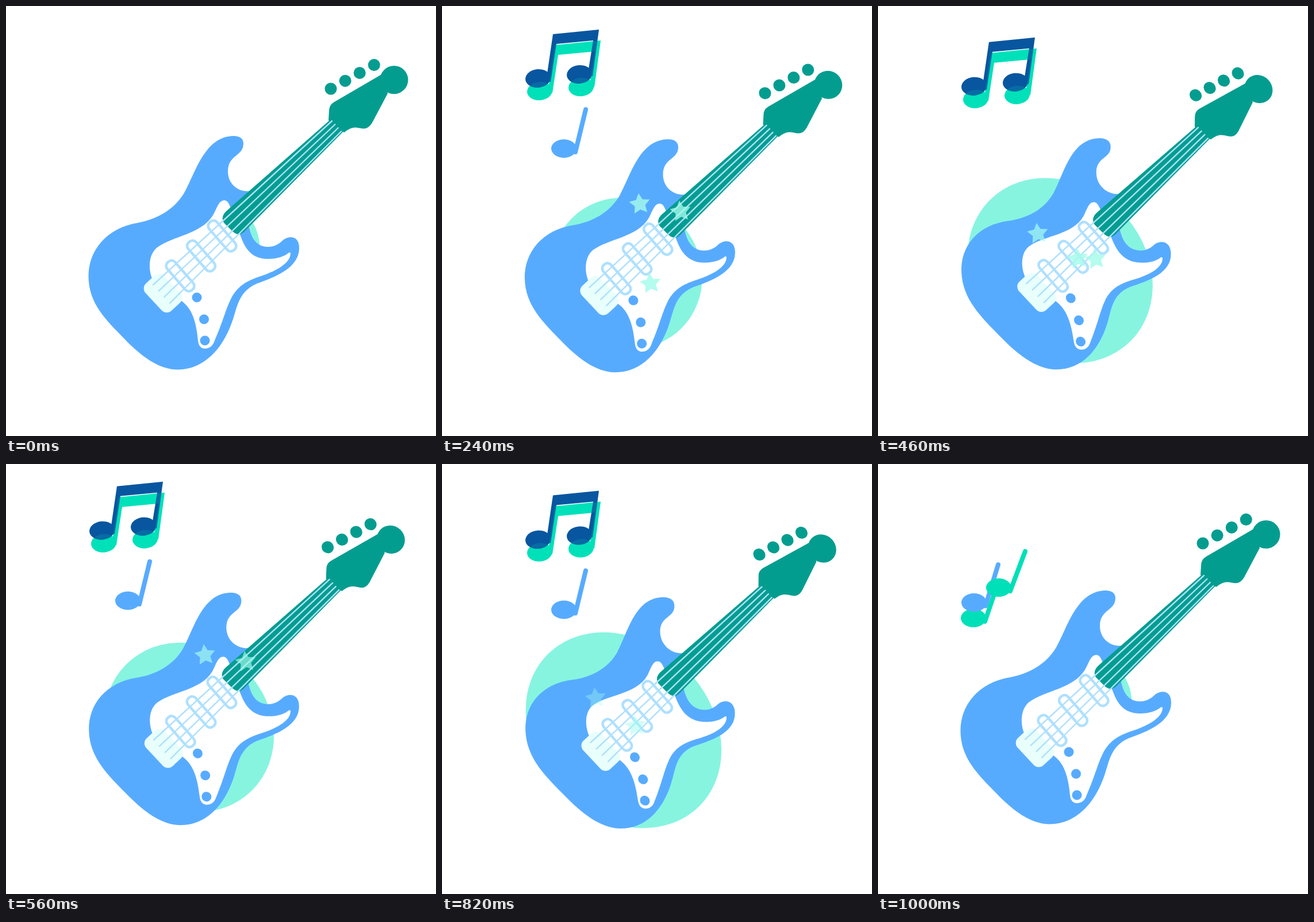
Animation, 748 px wide and 748 px high, one loop 1.02 s. Source, as an HTML page with a canvas:

```html
<!DOCTYPE html>
<html lang="en">
<head>
<meta charset="utf-8">
<title>Guitar</title>
<style>
html, body { margin: 0; width: 100%; height: 100%; overflow: hidden; background: #fff; }
canvas { display: block; width: 100vw; height: 100vh; }
</style>
</head>
<body>
<canvas id="stage" width="748" height="748"></canvas>
<script>
const ctx = document.getElementById('stage').getContext('2d');
const LOOP = 1020, BEAT = 340, SWING = 320, STEP = 20;
const BLUE = '#57abff', TEAL = '#039d90', GREEN = '#00e0b8', NAVY = '#0856a0';
const MINT = '#87f4e0', STRING = '#aee0ff', STAR = '#a6fcec';

const body = new Path2D('M424 322C402 324 386 308 386 288C386 258 413 262 413 239C413 229 404 226 396 226C345 227 330 290 310 325C292 355 262 371 230 377C175 386 143.5 425 143.5 470C143.5 518 175 547 206 579C234 608 265 632.5 299 632.5C345 632 376 596 392 553C402 528 402 498 436 483C470 471 510 455 510 421C510 398 490 399 480 409C465 423 445 421 435 411C424 400 424 385 419 372Z');
const guard = new Path2D('M380 338C370 338 367 352 360 364C340 397 290 400 263 420C247 433 247 460 256 478L300 510C325 523 331 552 334 582C335 592 340 596 346 596C354 596 360 591 363 582C377 550 382 528 391 510C402 487 420 478 440 471C468 462 495 448 495 430C494 427 491 430 488 432C474 441 450 442 438 437C412 427 409 398 398 374C391 352 388 338 380 338Z');
const neck = new Path2D('M565 197L383 357Q373 367 379 377L393 391Q404 402 414 393L592 213Z');
const head = new Path2D('M561 199L562 182Q562 172 571 167L655 118L664 152L637 203Q630 215 619 213C605 210 600 211 588 220Z');
const beam = new Path2D('M181 137L193 55L273 47L262 128L253 128L263 66L199 72L189 138Z');

const clamp = x => Math.max(0, Math.min(1, x));

function fill(color, path) {
  ctx.fillStyle = color;
  ctx.fill(path);
}

function oval(color, x, y, rx, ry = rx, tilt = 0) {
  ctx.beginPath();
  ctx.ellipse(x, y, rx, ry, tilt, 0, 7);
  ctx.fillStyle = color;
  ctx.fill();
}

function line(color, width, x1, y1, x2, y2) {
  ctx.strokeStyle = color;
  ctx.lineWidth = width;
  ctx.lineCap = 'round';
  ctx.beginPath();
  ctx.moveTo(x1, y1);
  ctx.lineTo(x2, y2);
  ctx.stroke();
}

function roundBox(x, y, w, h, r, deg) {
  ctx.save();
  ctx.translate(x, y);
  ctx.rotate(deg * Math.PI / 180);
  ctx.beginPath();
  ctx.roundRect(-w / 2, -h / 2, w, h, r);
  ctx.restore();
}

function drawDisc(p) {
  const q = p ** 0.25, k = 0.11 * p * p;
  ctx.save();
  ctx.transform(1, k, k, 1, 351 - 35.5 * q, 416 + 47.5 * q);
  oval(MINT, 0, 0, 90.5 + 82 * p);
  ctx.restore();
}

function drawGuitar(k) {
  ctx.save();
  // Squash along the neck: shear about (135, 425).
  ctx.transform(1, k, k, 1, -425 * k, -135 * k);
  ctx.translate(0, -6);
  fill(BLUE, body);
  fill('#fff', guard);
  roundBox(273, 499.5, 65, 44, 12, 47);
  ctx.fillStyle = '#e8fffb';
  ctx.fill();
  oval(BLUE, 332, 507, 8.5);
  oval(BLUE, 344.5, 545, 8.5);
  oval(BLUE, 346, 582, 8.5);
  fill(TEAL, neck);
  fill(TEAL, head);
  oval(TEAL, 675, 128.5, 24.5);
  for (let i = 0; i < 4; i++) {
    oval(TEAL, 565 + 25.1 * i, 144 - 13.8 * i, 10.5);
    line(STRING, 2.4, 256 + 9.7 * i, 485 + 10.6 * i, 567 + 5.4 * i, 200 + 6 * i);
  }
  for (let i = 0; i < 3; i++) {
    roundBox(303 + 36.5 * i, 469.5 - 34.7 * i, 64, 18, 8, 49);
    ctx.lineWidth = 4.5;
    ctx.stroke();
  }
  ctx.restore();
}

function note(color, x, y, stemX, stemY) {
  line(color, 8, x + 20, y + 6, x + stemX, y + stemY);
  oval(color, x, y, 22, 16);
}

function pairShape(color, dx, dy, drop = 0) {
  ctx.save();
  ctx.translate(dx, dy);
  const shape = new Path2D(beam);
  for (const [x, y] of [[167, 132], [239, 125]]) {
    const part = new Path2D();
    part.ellipse(x, y + drop, 22, 16, -0.1, 0, 7);
    shape.addPath(part);
  }
  fill(color, shape);
  ctx.restore();
}

function drawPair(dy) {
  pairShape(GREEN, 3, 19 + dy, 3);
  pairShape(NAVY, 0, dy);
  // Let a little green show through the overlap.
  ctx.globalAlpha = 0.15;
  pairShape(GREEN, 3, 19 + dy, 3);
  ctx.globalAlpha = 1;
}

function drawNotes(ph) {
  const rise = 61 * (1 - clamp((ph - 60) / 130)) ** 1.5 - 15;
  if (ph >= 60 && ph < 250) drawPair(rise);
  if (ph >= 130 && ph < 250) note(BLUE, 212, 254 + rise, 38, -68);
  if (ph >= 250 && ph < 335) {
    const lag = (SWING - ph) * 0.2;
    note(GREEN, 166, 268 + lag, 40, -53);
    note(BLUE, 167, 241 + lag, 42, -66);
    note(GREEN, 210, 215 + lag, 46, -63);
  }
}

// A star accelerates along its drift, fading in and quickly out.
function drawStar(t, born, life, x, y, dx, dy) {
  const u = (t - born) / life;
  if (u <= 0 || u >= 1) return;
  const s = u ** 2.4;
  ctx.save();
  ctx.translate(x + dx * s, y + dy * s);
  ctx.rotate(-0.12);
  ctx.globalAlpha = 0.85 * Math.min(1, u * 3, (1 - u) * 8);
  ctx.beginPath();
  for (let i = 0; i < 10; i++) {
    const r = i % 2 ? 9.5 : 19, a = i * Math.PI / 5;
    ctx.lineTo(r * Math.sin(a), -r * Math.cos(a));
  }
  ctx.fillStyle = STAR;
  ctx.fill();
  ctx.restore();
}

function drawStars(t) {
  for (const beat of [0, BEAT]) {
    drawStar(t, beat + 120, 380, 350, 330, -94, 88);
    drawStar(t, beat + 120, 390, 421, 340, -102, 140);
    drawStar(t, beat * 0.85 + 70, 200, 385, 429, -33, 66);
  }
  drawStar(t, 560, 200, 305, 387, -40, 70);
}

function draw(t) {
  const ph = t % BEAT, u = clamp(ph / SWING);
  const swell = (1 - Math.cos(2 * Math.PI * u)) / 2;
  const squash = 0.0455 * Math.sin(Math.PI * u ** 0.83) ** 3;
  const lift = t < BEAT
    ? 6 + 3 * Math.sin(2.2 * u)
    : -1.5 * Math.sin(Math.PI * clamp((t - BEAT) / SWING));
  ctx.setTransform(1, 0, 0, 1, 0, 0);
  ctx.fillStyle = '#fff';
  ctx.fillRect(0, 0, 748, 748);
  ctx.translate(0, lift);
  drawDisc(swell);
  drawGuitar(squash);
  drawNotes(ph);
  drawStars(t);
}

const start = performance.now();
function tick() {
  const t = (performance.now() - start) % LOOP;
  draw(Math.floor(t / STEP) * STEP);
  requestAnimationFrame(tick);
}
tick();
</script>
</body>
</html>
```
